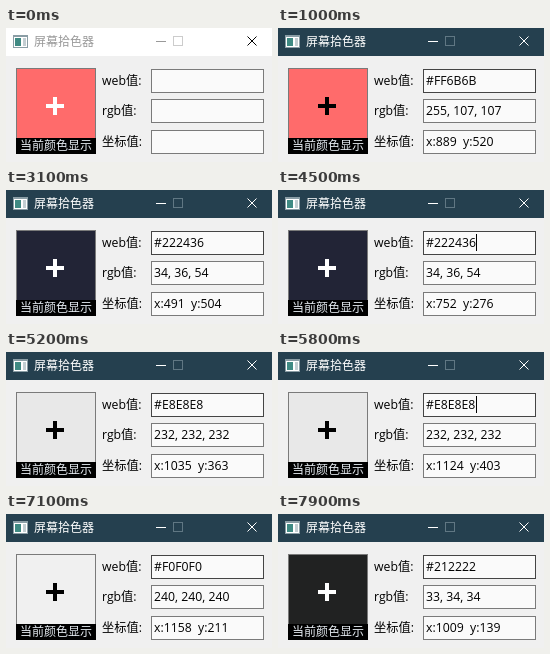
An HTML page for the animation above (8 s loop, 266 by 134 pixels).

```html
<!DOCTYPE html>
<html lang="zh">
<head>
<meta charset="utf-8">
<style>
html, body { margin: 0; width: 100%; height: 100%; overflow: hidden; background: #f0f0f0; }
svg { display: block; width: 100%; height: 100%; }
text { font: 12.25px "Open Sans", "Noto Sans CJK SC", "Noto Sans CJK", sans-serif; white-space: pre; }
.cjk { font-size: 12px; }
#bar { fill: #fff; }
#title { fill: #999; }
#controls { fill: none; stroke: #999; }
#maximize { stroke: #ccc; }
.field { fill: #fafafa; stroke: #7a7a7a; }
.active #bar { fill: #25404f; }
.active #title { fill: #fff; }
.active #controls { stroke: #fff; }
.active #maximize { stroke: #607783; }
.active #field0 { stroke: #444; }
</style>
</head>
<body>
<svg id="window" viewBox="0 0 266 134">
  <rect width="266" height="134" fill="#f0f0f0"/>
  <rect id="bar" width="266" height="28"/>
  <g shape-rendering="crispEdges">
    <rect x="7" y="7" width="15" height="13" fill="#8a9da5"/>
    <rect x="8" y="9" width="13" height="10" fill="#fff"/>
    <rect x="9" y="10" width="6" height="8" fill="#3f8a83"/>
    <rect x="17" y="10" width="3" height="8" fill="#c3ced2"/>
  </g>
  <text id="title" class="cjk" x="28" y="18">屏幕拾色器</text>
  <g id="controls">
    <path d="M150 13.5h10"/>
    <rect id="maximize" x="167.5" y="8.5" width="9" height="9"/>
    <path id="close" d="M241.5 8.5l9 9m0-9l-9 9"/>
  </g>
  <rect x="10.5" y="40.5" width="79" height="85" fill="#000" stroke="#7a7a7a"/>
  <rect id="swatch" x="11" y="41" width="78" height="69"/>
  <path id="cross" d="M40 78h18m-9-9v18" stroke-width="4"/>
  <rect x="10" y="110" width="80" height="16"/>
  <text class="cjk" x="14" y="122" fill="#e6ecf2">当前颜色显示</text>
  <g id="rows"></g>
  <path id="caret" d="M198.5 44v17" stroke="#000"/>
</svg>
<script>
const $ = id => document.getElementById(id);
const LOOP = 8000, STEP = 100, START = 600;

// Pointer path: [ms, x, y]
const path = [
  [700, 930, 517], [1000, 889, 520], [1700, 690, 535], [2500, 520, 515], [3100, 491, 504],
  [3700, 600, 400], [4500, 752, 276], [5000, 1005, 350], [5800, 1124, 403],
  [6600, 1281, 274], [7500, 1060, 160], [7600, 1060, 160], [7900, 1009, 139]
];
// Colour under the pointer: [ms, rgb]
const colors = [
  [0, [255, 107, 107]], [1300, [240, 240, 240]], [1500, [30, 32, 48]], [1800, [34, 36, 54]],
  [4900, [232, 232, 232]], [6200, [240, 240, 240]], [7200, [43, 43, 43]], [7700, [33, 34, 34]]
];

$("rows").innerHTML = ["web值:", "rgb值:", "坐标值:"].map((label, i) => {
  const top = [41, 71, 102][i];
  return `<text x="96" y="${top + 16}">${label}</text>
    <rect id="field${i}" class="field" x="145.5" y="${top + .5}" width="112" height="23"/>
    <text id="value${i}" x="148" y="${top + 16}"></text>`;
}).join("");

function pointerAt(t) {
  const next = path.findIndex(point => point[0] > t);
  if (next === 0) return path[0].slice(1);
  if (next < 0) return path.at(-1).slice(1);
  const a = path[next - 1], b = path[next];
  const k = (t - a[0]) / (b[0] - a[0]);
  return [1, 2].map(i => Math.round(a[i] + (b[i] - a[i]) * k));
}

function draw(time) {
  const t = Math.floor(time % LOOP / STEP) * STEP;
  const active = t >= START;
  const rgb = colors.findLast(([start]) => start <= t)[1];
  const [r, g, b] = rgb;
  const [x, y] = pointerAt(t);
  const hex = "#" + rgb.map(c => c.toString(16).padStart(2, "0")).join("").toUpperCase();
  const bright = .299 * r + .587 * g + .114 * b > 128;

  $("window").classList.toggle("active", active);
  $("close").style.stroke = t < 100 ? "#000" : "";
  $("swatch").setAttribute("fill", hex);
  $("cross").setAttribute("stroke", active && bright ? "#000" : "#fff");
  [hex, rgb.join(", "), `x:${x}  y:${y}`].forEach((value, i) => {
    $("value" + i).textContent = active ? value : "";
  });
  const blink = t % 1000;
  $("caret").style.display = active && blink >= 400 && blink < 900 ? "" : "none";
}

function frame() {
  draw(performance.now());
  requestAnimationFrame(frame);
}
frame();
</script>
</body>
</html>
```
